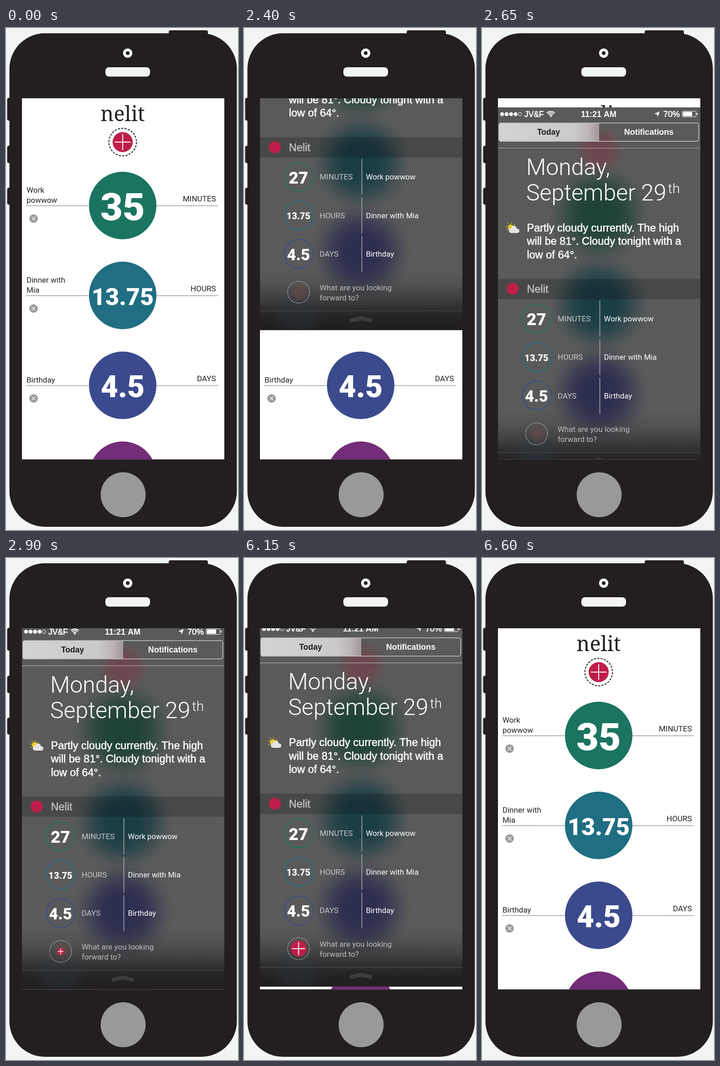
Write an HTML page with a canvas that moves like this. It is 509 px wide and 1100 px high and loops after 8350 ms.

```html
<!DOCTYPE html>
<html lang="en">
<head>
<meta charset="utf-8">
<title>Countdown app</title>
<style>
  html, body { margin: 0; width: 100%; height: 100%; overflow: hidden; background: #f3f5f4; }
  canvas { display: block; width: 509px; height: 1100px; }
</style>
</head>
<body>
<canvas id="stage"></canvas>
<script>
const W = 509, H = 1100, LOOP = 8350, STEP = 50, TAU = Math.PI * 2;
const SCREEN = { x: 35, y: 154, w: 444, h: 791.5 };
const PANEL_H = 799;
const INK = '#231f20', PAPER = '#f3f5f4', RED = '#bf1e4b', GREY = '#999';
const ROBOTO = 'Roboto, sans-serif';
const HELV = '"Liberation Sans", Arial, sans-serif';

const events = [
  { color: '#1a7460', glow: '#173f34', unit: 'MINUTES', name: ['Work', 'powwow'], big: ['35', 84], small: ['27', 37] },
  { color: '#1f6e82', glow: '#123a43', unit: 'HOURS', name: ['Dinner with', 'Mia'], big: ['13.75', 52], small: ['13.75', 20] },
  { color: '#3b4a8d', glow: '#27294e', unit: 'DAYS', name: ['Birthday'], big: ['4.5', 66], small: ['4.5', 34.5] }
];

const canvas = document.getElementById('stage');
const ctx = canvas.getContext('2d');
const dpr = window.devicePixelRatio || 1;
canvas.width = W * dpr;
canvas.height = H * dpr;

// ---- timing ----

function bezier(x1, y1, x2, y2) {
  const at = (a, b, s) => 3 * a * s * (1 - s) ** 2 + 3 * b * (1 - s) * s * s + s ** 3;
  return x => {
    if (x <= 0) return 0;
    if (x >= 1) return 1;
    let lo = 0, hi = 1;
    for (let i = 0; i < 30; i++) {
      const mid = (lo + hi) / 2;
      if (at(x1, x2, mid) < x) lo = mid; else hi = mid;
    }
    return at(y1, y2, lo);
  };
}
const ease = bezier(0.25, 0.1, 0.25, 1);
const easeIn = bezier(0.42, 0, 1, 1);

// keys: [time, value] pairs, eased between neighbours
function track(keys, t) {
  if (t <= keys[0][0]) return keys[0][1];
  for (let i = 1; i < keys.length; i++) {
    const [t0, v0] = keys[i - 1], [t1, v1] = keys[i];
    if (t < t1) return v0 + (v1 - v0) * ease((t - t0) / (t1 - t0));
  }
  return keys[keys.length - 1][1];
}

const dropKeys = [[2105.5, -1600], [2690, 24], [2884.5, -8], [3079, 0]];
const plusKeys = [[2838, 0], [3090, 1.08], [3250, 0.94], [3500, 1]];

function panelOffset(t) {
  return t < 6100 ? track(dropKeys, t) : -PANEL_H * easeIn((t - 6100) / 500);
}

// ---- drawing helpers ----

function text(str, x, y, size, color, opt = {}) {
  ctx.font = `${opt.weight || 400} ${size}px ${opt.font || ROBOTO}`;
  ctx.textAlign = opt.align || 'left';
  ctx.fillStyle = color;
  ctx.fillText(str, x, y);
  if (opt.medium) {
    ctx.strokeStyle = color;
    ctx.lineWidth = 0.6;
    ctx.strokeText(str, x, y);
  }
}

function disc(x, y, r, color) {
  ctx.fillStyle = color;
  ctx.beginPath();
  ctx.arc(x, y, r, 0, TAU);
  ctx.fill();
}

function ring(x, y, r, color, width, dash = []) {
  ctx.strokeStyle = color;
  ctx.lineWidth = width;
  ctx.setLineDash(dash);
  ctx.beginPath();
  ctx.arc(x, y, r, 0, TAU);
  ctx.stroke();
  ctx.setLineDash([]);
}

function line(points, color, width, dash = []) {
  ctx.strokeStyle = color;
  ctx.lineWidth = width;
  ctx.setLineDash(dash);
  ctx.beginPath();
  points.forEach(([x, y]) => ctx.lineTo(x, y));
  ctx.stroke();
  ctx.setLineDash([]);
}

function box(x, y, w, h, r, color) {
  ctx.beginPath();
  ctx.roundRect(x, y, w, h, r);
  if (color) {
    ctx.fillStyle = color;
    ctx.fill();
  }
}

function cross(x, y, r, color, width) {
  line([[x - r, y], [x + r, y]], color, width);
  line([[x, y - r], [x, y + r]], color, width);
}

function addButton(x, y, r, arm, width) {
  disc(x, y, r, RED);
  cross(x, y, arm, '#fff', width);
}

function glow(x, y, r, color, strength) {
  const g = ctx.createRadialGradient(x, y, 0, x, y, r);
  [[0, 1], [0.35, 0.93], [0.55, 0.7], [0.75, 0.32], [0.9, 0.08], [1, 0]].forEach(([at, k]) => {
    const a = Math.round(255 * strength * k).toString(16).padStart(2, '0');
    g.addColorStop(at, color + a);
  });
  disc(x, y, r, g);
}

// ---- scene ----

function drawPhone() {
  ctx.fillStyle = PAPER;
  ctx.fillRect(0, 0, W, H);
  box(357, 5, 86, 20, 4, INK);
  [[153, 50], [258, 38], [350, 37]].forEach(([y, h]) => box(2.5, y, 14, h, 4, INK));
  box(7.5, 11.5, 499, 1081.5, 78, INK);
  disc(267, 55, 10.3, PAPER);
  disc(267, 55, 4, INK);
  box(218, 86, 98, 20.5, 8, PAPER);
  disc(257, 1022.7, 49.3, GREY);
}

function drawApp() {
  ctx.fillStyle = '#fff';
  ctx.fillRect(SCREEN.x, SCREEN.y, SCREEN.w, SCREEN.h);
  text('nelit', 256, 204, 45, INK, { font: '"Noto Serif", serif', weight: 300, align: 'center' });
  ring(256, 250, 30.2, INK, 2, [4.6, 2.7]);
  addButton(256, 250, 22, 17.5, 2);

  events.forEach((e, i) => {
    const y = 389 + i * 197;
    line([[45, y + 0.5], [182, y + 0.5]], INK, 1.5, [1.6, 2]);
    line([[331, y + 0.5], [465, y + 0.5]], INK, 1.5, [1.6, 2]);
    disc(256, y, 74, e.color);
    const [num, size] = e.big;
    text(num, 256, y + 2.5 + size * 0.355, size, '#fff', { weight: 900, align: 'center' });
    const last = e.name.length - 1;
    e.name.forEach((s, n) => text(s, 45, y - 6.5 - (last - n) * 22, 17, INK));
    text(e.unit, 460.5, y - 9, 17, INK, { align: 'right' });
    disc(60.5, y + 28.7, 9.3, GREY);
    ctx.save();
    ctx.translate(60.5, y + 28.7);
    ctx.rotate(Math.PI / 4);
    cross(0, 0, 6.2, '#fff', 1.3);
    ctx.restore();
  });
  disc(256, 980, 74, '#742d78');
}

function drawBackdrop() {
  ctx.fillStyle = '#5a5a5a';
  ctx.fillRect(35, 154, 444, PANEL_H);
  glow(258, 248, 58, '#75404a', 0.75);
  events.forEach((e, i) => glow(257, 387 + i * 197, 112, e.glow, 0.92));

  const fade = ctx.createLinearGradient(0, 154, 0, 953);
  [[0, 0], [0.83, 0], [0.87, 0.13], [0.91, 0.42], [0.94, 0.72], [0.965, 0.92], [1, 1]]
    .forEach(([at, a]) => fade.addColorStop(at, `rgba(32,30,31,${a})`));
  ctx.fillStyle = fade;
  ctx.fillRect(35, 154, 444, PANEL_H);
  glow(118, 915, 65, '#2c3a44', 0.35);
}

function drawStatus() {
  for (let i = 0; i < 4; i++) disc(44 + i * 9.9, 169, 4.3, '#fff');
  ring(83.5, 169, 3.8, '#fff', 1);
  text('JV&F', 93, 175, 17.5, '#fff', { font: HELV, medium: true });

  ctx.strokeStyle = '#fff';
  ctx.lineWidth = 2.2;
  [4.8, 8.6, 12].forEach(r => {
    ctx.beginPath();
    ctx.arc(151, 175, r, -Math.PI * 0.75, -Math.PI * 0.25);
    ctx.stroke();
  });
  disc(151, 173.6, 1.8, '#fff');

  text('11:21 AM', 256, 175, 18, '#fff', { font: HELV, weight: 700, align: 'center' });

  ctx.fillStyle = '#fff';
  ctx.beginPath();
  [[390, 163], [385.5, 175], [384, 169.5], [378, 168]].forEach(([x, y]) => ctx.lineTo(x, y));
  ctx.fill();

  text('70%', 398, 175, 18, '#fff', { font: HELV, medium: true });
  box(439.5, 162.5, 30, 12.5, 2);
  ctx.lineWidth = 1;
  ctx.stroke();
  box(441, 164, 20, 9.5, 1, '#fff');
  box(471, 166.5, 2, 4.5, 1, '#fff');
}

function drawTabs() {
  const g = ctx.createLinearGradient(37, 0, 256, 0);
  g.addColorStop(0, '#d3d3d3');
  g.addColorStop(0.75, '#cbcaca');
  g.addColorStop(0.9, '#bcb4b6');
  g.addColorStop(1, '#a2979a');
  box(37, 188.5, 219, 40, [4, 0, 0, 4], g);
  box(37, 188.5, 438.5, 40, 4);
  ctx.strokeStyle = '#c4c4c4';
  ctx.lineWidth = 1.5;
  ctx.stroke();
  line([[256, 188], [256, 229]], '#c4c4c4', 1.2);
  text('Today', 146, 214.7, 17.5, '#1c1c1c', { font: HELV, weight: 700, align: 'center' });
  text('Notifications', 366, 214.7, 17.9, '#fff', { font: HELV, weight: 700, align: 'center' });
  line([[35, 243.5], [479, 243.5]], 'rgba(255,255,255,.5)', 1.2);
}

function drawWeather() {
  text('Monday,', 97, 302, 50, '#fff', { weight: 300 });
  text('September 29', 97, 358, 50, '#fff', { weight: 300 });
  text('th', 408, 342.5, 30, '#fff', { weight: 300 });
  ['Partly cloudy currently. The high', 'will be 81°. Cloudy tonight with a', 'low of 64°.']
    .forEach((s, i) => text(s, 98.5, 426 + i * 29.5, 23.5, '#fff', { font: HELV, medium: true }));

  for (let i = 0; i < 8; i++) {
    const a = i * TAU / 8 + 0.2, c = Math.cos(a), s = Math.sin(a);
    line([[63 + c * 8, 417 + s * 8], [63 + c * 11, 417 + s * 11]], '#e3c62b', 1.5);
  }
  disc(63, 417, 6.3, '#e8cb25');
  disc(70, 420, 6.3, '#e4e4e4');
  disc(63.5, 424, 4.8, '#e4e4e4');
  box(60, 420, 22, 9.5, 4.7, '#e4e4e4');
}

function drawWidget(plus) {
  ctx.fillStyle = 'rgba(0,0,0,.2)';
  ctx.fillRect(35, 530, 444, 44.5);
  disc(67.5, 552, 13, RED);
  text('Nelit', 98.5, 560.3, 23.5, '#bdbdbd', { font: HELV, medium: true });

  events.forEach((e, i) => {
    const y = 617 + i * 84.4;
    ring(120, y, 31.6, e.color, 1.8);
    const [num, size] = e.small;
    text(num, 119.5, y + 1.5 + size * 0.355, size, '#fff', { weight: 900, align: 'center' });
    text(e.unit, 166, y + 6, 17, '#c6c6c6');
    line([[258.5, y - 39.5], [258.5, y + 39.5]], '#a9a9a9', 1.6);
    text(e.name.join(' '), 267.5, y + 6, 16.8, '#fff');
  });

  glow(122, 869.5, 24, '#6f4b47', 0.55);
  ring(119.8, 869.5, 24, '#b0b0b0', 1.4, [3.6, 2]);
  if (plus > 0) addButton(119.8, 869.5, 17.6 * plus, 14.3 * plus, 2 * Math.max(plus, 0.7));
  text('What are you looking', 166, 865.7, 17, '#bcbcbc');
  text('forward to?', 166, 887.7, 17, '#bcbcbc');

  line([[35, 910.5], [479, 910.5]], '#484c50', 1.2);
  ctx.lineCap = ctx.lineJoin = 'round';
  line([[236, 931.5], [256.5, 926.5], [277, 931.5]], '#3b3d3f', 8.5);
  ctx.lineCap = 'butt';
  ctx.lineJoin = 'miter';
}

function drawPanel(t) {
  const dy = panelOffset(t);
  if (dy <= -PANEL_H) return;
  ctx.save();
  ctx.translate(0, dy);
  ctx.beginPath();
  ctx.rect(35, 154, 444, PANEL_H);
  ctx.clip();
  drawBackdrop();
  drawStatus();
  drawTabs();
  drawWeather();
  drawWidget(track(plusKeys, t));
  ctx.restore();
}

function render(t) {
  ctx.setTransform(dpr, 0, 0, dpr, 0, 0);
  drawPhone();
  ctx.save();
  ctx.beginPath();
  ctx.rect(SCREEN.x, SCREEN.y, SCREEN.w, SCREEN.h);
  ctx.clip();
  drawApp();
  drawPanel(t);
  ctx.restore();
}

const start = performance.now();
function tick() {
  const t = (performance.now() - start) % LOOP;
  render(Math.floor(t / STEP) * STEP);
  requestAnimationFrame(tick);
}
tick();
</script>
</body>
</html>
```
